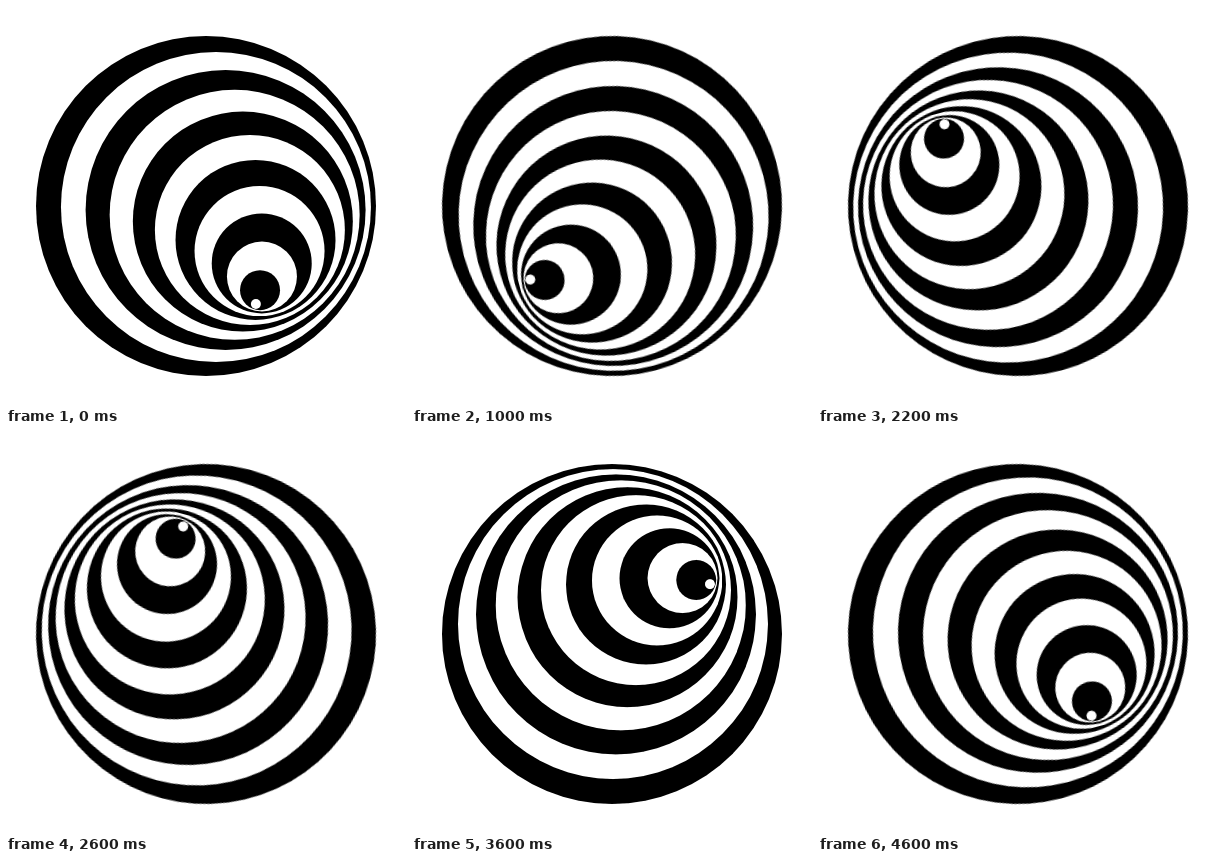
Animation, 400 px wide and 400 px high, one loop 4800 ms. Source, as an HTML page:

```html
<!DOCTYPE html>
<html lang="en">
<head>
<meta charset="utf-8">
<title>Rotating spiral of discs</title>
<style>
  html, body {
    margin: 0;
    width: 100%;
    height: 100%;
    overflow: hidden;
    background: #fff;
  }
  svg {
    display: block;
    width: 100%;
    height: 100%;
  }
  #discs {
    transform-origin: 0 0;
    animation: turn 4800ms steps(24, end) infinite;
  }
  @keyframes turn {
    from { transform: rotate(0deg); }
    to { transform: rotate(360deg); }
  }
</style>
</head>
<body>
<svg viewBox="-200 -200 400 400">
  <g id="discs"></g>
</svg>
<script>
  const discs = document.getElementById("discs");
  const COUNT = 12;

  // Shrinking discs whose centres follow an Archimedean spiral.
  for (let n = 0; n < COUNT; n++) {
    const angle = 0.1 * n;
    const dist = 10 * n;
    const disc = document.createElementNS(discs.namespaceURI, "circle");
    disc.setAttribute("cx", dist * Math.cos(angle));
    disc.setAttribute("cy", dist * Math.sin(angle));
    disc.setAttribute("r", 170 - 15 * n);
    disc.setAttribute("fill", n % 2 ? "#fff" : "#000");
    discs.append(disc);
  }
</script>
</body>
</html>
```
